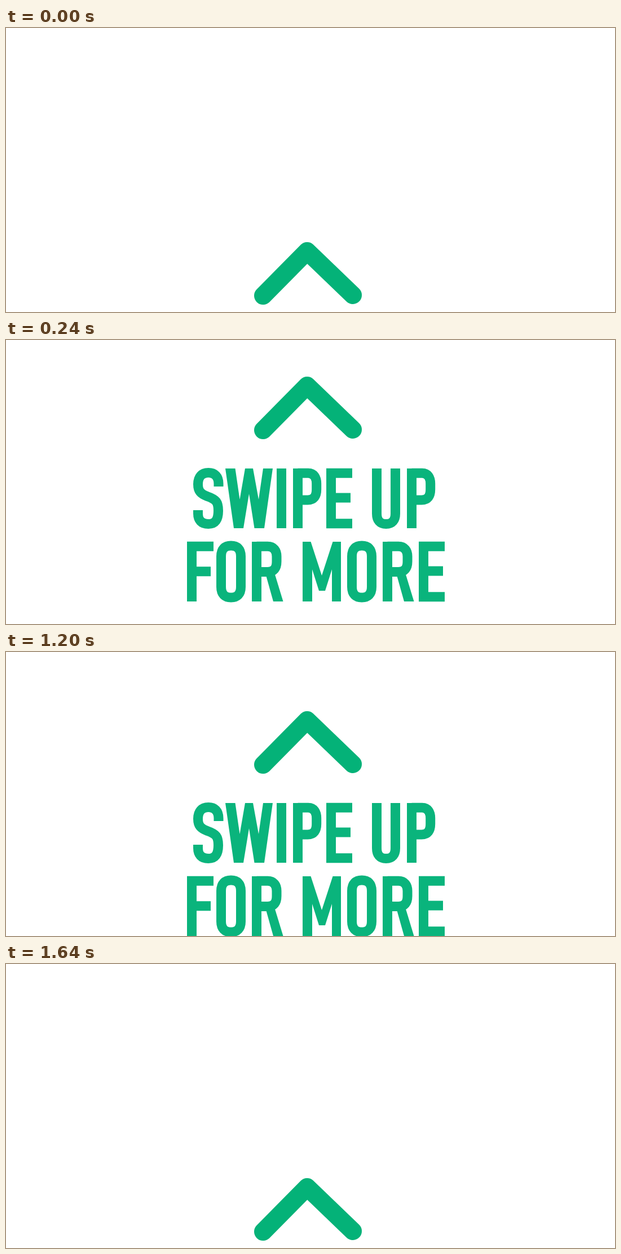
Animation, 1080 px wide and 504 px high, one loop 1.96 s. Source, as an HTML page with a canvas:

```html
<!DOCTYPE html>
<html lang="en">
<head>
<meta charset="utf-8">
<title>Swipe up for more</title>
<style>
  html, body { margin: 0; width: 100%; height: 100%; overflow: hidden; background: #fff; }
  canvas { display: block; width: 100vw; height: 100vh; }
</style>
</head>
<body>
<canvas id="stage" width="1080" height="504" role="img" aria-label="Swipe up for more">SWIPE UP FOR MORE</canvas>
<script>
const ctx = document.getElementById('stage').getContext('2d');
const LOOP = 1960, STEP = 40;
const ARROW_COLOR = '#04b278', TEXT_COLOR = '#0ab47c';
const STEM = 17;

// Condensed letters with a cap height of 106, origin at the top left.
const bowl = 'M8.5 0V106M8.5 8.2H27C37 8.2 41.7 16 41.7 27V37C41.7 49 37 56 26 56H8.5';
const letters = {
  S: { stroke: 'M45 32V27C45 14 38 7.5 27 7.5C15 7.5 8.5 15 8.5 28C8.5 40 13 45 25 49.5C41 55 44.5 60 44.5 75C44.5 91 39 98.5 27 98.5C14 98.5 8.5 91 8.5 80V74' },
  W: { fill: 'M0 0H17.5L25.5 55L35 0H49L59 55L67 0H84L69 106H51.5L42 45L32 106H15Z' },
  I: { stroke: 'M8.5 0V106' },
  P: { stroke: bowl },
  E: { stroke: 'M46 8.2H8.5V97.8H46M8.5 52H43' },
  U: { stroke: 'M8.5 0V80C8.5 92 14 98.5 25 98.5S41.5 92 41.5 80V0' },
  F: { stroke: 'M47 8.2H8.5V106M8.5 52.7H42' },
  O: { stroke: 'M8.5 26C8.5 13 15 7 26 7S43.5 13 43.5 26V80C43.5 93 37 99 26 99S8.5 93 8.5 80Z' },
  R: { stroke: 'M8.5 0V106M8.5 8.2H28C39 8.2 44 16 44 26V35C44 47 39 53.5 28 53.5H8.5',
       fill: 'M24 56L38 106H55.5L40 55Z' },
  M: { fill: 'M0 0H14.5L34 60L53.5 0H68V106H52V49L40 87H29L17 49V106H0Z' }
};
for (const glyph of Object.values(letters)) {
  for (const kind in glyph) glyph[kind] = new Path2D(glyph[kind]);
}

const lines = [
  { text: 'SWIPEUP', y: 213, xs: [332, 389, 480, 509, 568, 649, 711] },
  { text: 'FORMORE', y: 343, xs: [321, 373, 436, 526, 605, 668, 732] }
];
const arrow = new Path2D('M456 145L534 66L615 144');

// [step, vertical offset], joined by straight segments
const keys = [[0, 330], [4, 0], [8, 29.5], [13, 0], [29, 0], [35, 330], [38, 300.5], [41, 330], [49, 330]];

function offsetAt(step) {
  const i = keys.findIndex(([s]) => s > step);
  const [s0, y0] = keys[i - 1], [s1, y1] = keys[i];
  return y0 + (y1 - y0) * (step - s0) / (s1 - s0);
}

function drawLetter(name, x, y) {
  const { stroke, fill } = letters[name];
  ctx.save();
  ctx.translate(x, y);
  if (stroke) ctx.stroke(stroke);
  if (fill) ctx.fill(fill);
  ctx.restore();
}

function draw(now) {
  const step = Math.floor((now % LOOP) / STEP);
  ctx.fillStyle = '#fff';
  ctx.fillRect(0, 0, 1080, 504);
  ctx.save();
  ctx.translate(0, Math.round(offsetAt(step)));

  ctx.lineCap = ctx.lineJoin = 'round';
  ctx.lineWidth = 32;
  ctx.strokeStyle = ARROW_COLOR;
  ctx.stroke(arrow);

  ctx.lineCap = 'butt';
  ctx.lineJoin = 'miter';
  ctx.lineWidth = STEM;
  ctx.strokeStyle = ctx.fillStyle = TEXT_COLOR;
  for (const { text, y, xs } of lines) {
    xs.forEach((x, i) => drawLetter(text[i], x, y));
  }
  ctx.restore();
}

const start = performance.now();
function tick() {
  draw(performance.now() - start);
  requestAnimationFrame(tick);
}
tick();
</script>
</body>
</html>
```
